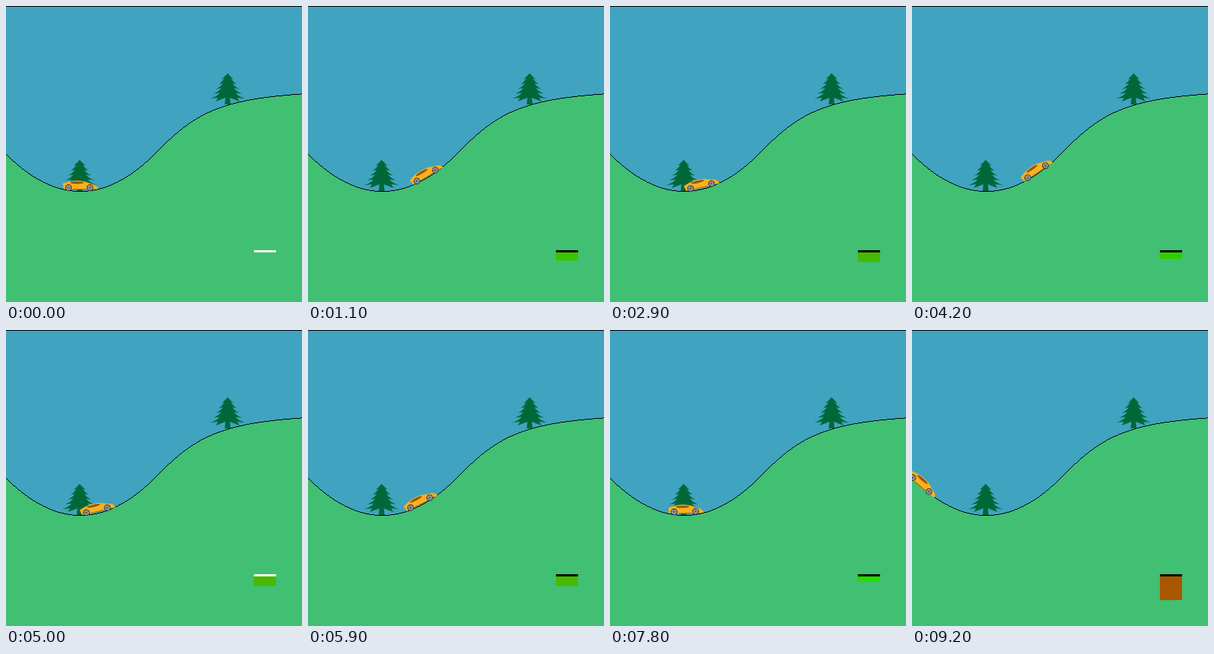
An HTML page with a canvas that plays this animation: 400 by 400 pixels, repeating every 9.3 s.

```html
<!DOCTYPE html>
<html lang="en">
<head>
<meta charset="utf-8">
<title>Car on the hill</title>
<style>
  html, body { margin: 0; width: 100%; height: 100%; overflow: hidden; }
  canvas { display: block; width: 400px; height: 400px; }
</style>
</head>
<body>
<canvas id="stage" width="400" height="400"></canvas>
<script>
const ctx = document.getElementById('stage').getContext('2d');
const STEP = 100, STEPS = 93, REVERSE_AT = 87;
const MAX_SPEED = 3, GRAVITY = 9.81, THRUST = 4;

const hill = p => p < 0 ? p * p + p : p / Math.sqrt(1 + 5 * p * p);
const toX = p => 200 + 200 * p;
const toY = p => 200 - 200 * hill(p);

// The car swings under full throttle, then reverses; explicit Euler at 1 ms.
function simulate() {
  const states = [];
  let p = -0.5, s = 0;
  for (let i = 0; i < STEPS; i++) {
    states.push({ p, s });
    const thrust = i < REVERSE_AT ? THRUST : -THRUST;
    for (let k = 0; k < STEP; k++) {
      const slope = 2 * p + 1;
      const acc = (thrust - GRAVITY * slope - 2 * s * s * slope) / (1 + slope * slope);
      p += s * 0.001;
      s += acc * 0.001;
    }
  }
  return states;
}

function rect(color, x, y, w, h) {
  ctx.fillStyle = color;
  ctx.fillRect(x, y, w, h);
}

function oval(color, x, y, rx, ry = rx) {
  ctx.fillStyle = color;
  ctx.beginPath();
  ctx.ellipse(x, y, rx, ry, 0, 0, 2 * Math.PI);
  ctx.fill();
}

// One side of a fir: five widening tiers of drooping branches, then the trunk.
function drawTreeSide(side) {
  ctx.beginPath();
  ctx.moveTo(0, 0);
  for (let i = 0; i < 5; i++) {
    const x = 8 + 3.9 * i, y = 8 + 6.5 * i;
    ctx.quadraticCurveTo(side * x * 0.6, y - 3, side * x, y);
    ctx.lineTo(side * x * 0.55, y - 1);
  }
  ctx.lineTo(side * 16, 38);
  ctx.lineTo(side * 3, 33);
  ctx.lineTo(side * 4, 42);
  ctx.lineTo(0, 42);
  ctx.fill();
}

function drawTree(p) {
  ctx.save();
  ctx.translate(toX(p) - 0.5, Math.round(toY(p)) - 42);
  ctx.fillStyle = '#006838';
  rect('#006838', -0.5, 0, 1, 42);
  drawTreeSide(-1);
  drawTreeSide(1);
  ctx.restore();
}

function drawScene() {
  rect('#40a3bf', 0, 0, 400, 400);
  rect('#000', 0, 0, 400, 1);
  for (let x = 0; x < 400; x++) {
    const y = Math.round(toY(x / 200 - 1));
    rect('#41bf73', x, y, 1, 400 - y);
    rect('#000', x, y, 1, 1);
  }
  drawTree(-0.5);
  drawTree(0.5);
}

function drawWheel(x) {
  oval('#3a3328', x, 2.5, 4.5);
  oval('#a9adb4', x, 2.5, 3.4);
  ctx.strokeStyle = '#4a4a50';
  ctx.lineWidth = 0.8;
  ctx.beginPath();
  for (let a = 0; a < 2 * Math.PI; a += Math.PI * 0.4) {
    ctx.moveTo(x, 2.5);
    ctx.lineTo(x + 3.2 * Math.sin(a), 2.5 - 3.2 * Math.cos(a));
  }
  ctx.stroke();
}

function drawCar(p) {
  const angle = -Math.atan(2 * p + 1);
  ctx.save();
  ctx.translate(toX(p), toY(p) - 7 + 2 * Math.abs(Math.sin(angle)));
  ctx.rotate(angle);
  ctx.fillStyle = '#fdb01e';
  ctx.beginPath();
  ctx.moveTo(-23.5, -3);
  ctx.quadraticCurveTo(-3, -11, 14, -3);
  ctx.quadraticCurveTo(24, -1.5, 24, 4.5);
  ctx.lineTo(-22, 4.5);
  ctx.fill();
  oval('#8a5a14', -4, -4.2, 9, 1.7);
  rect('#b06f10', -10, 4, 18, 1.2);
  drawWheel(-15.5);
  drawWheel(13.5);
  ctx.restore();
}

function drawSpeed(s) {
  const ratio = Math.min(1, Math.abs(s) / MAX_SPEED);
  const red = Math.floor(255 * ratio);
  rect(`rgb(${red},${255 - red},0)`, 335, 333, 30, Math.floor(50 * ratio));
  rect(s < 0 ? '#000' : '#fff', 335, 330, 30, 3);
}

const states = simulate();
const start = performance.now();

function tick() {
  const elapsed = performance.now() - start;
  const { p, s } = states[Math.floor(elapsed / STEP) % STEPS];
  drawScene();
  drawCar(p);
  drawSpeed(s);
  requestAnimationFrame(tick);
}
tick();
</script>
</body>
</html>
```
